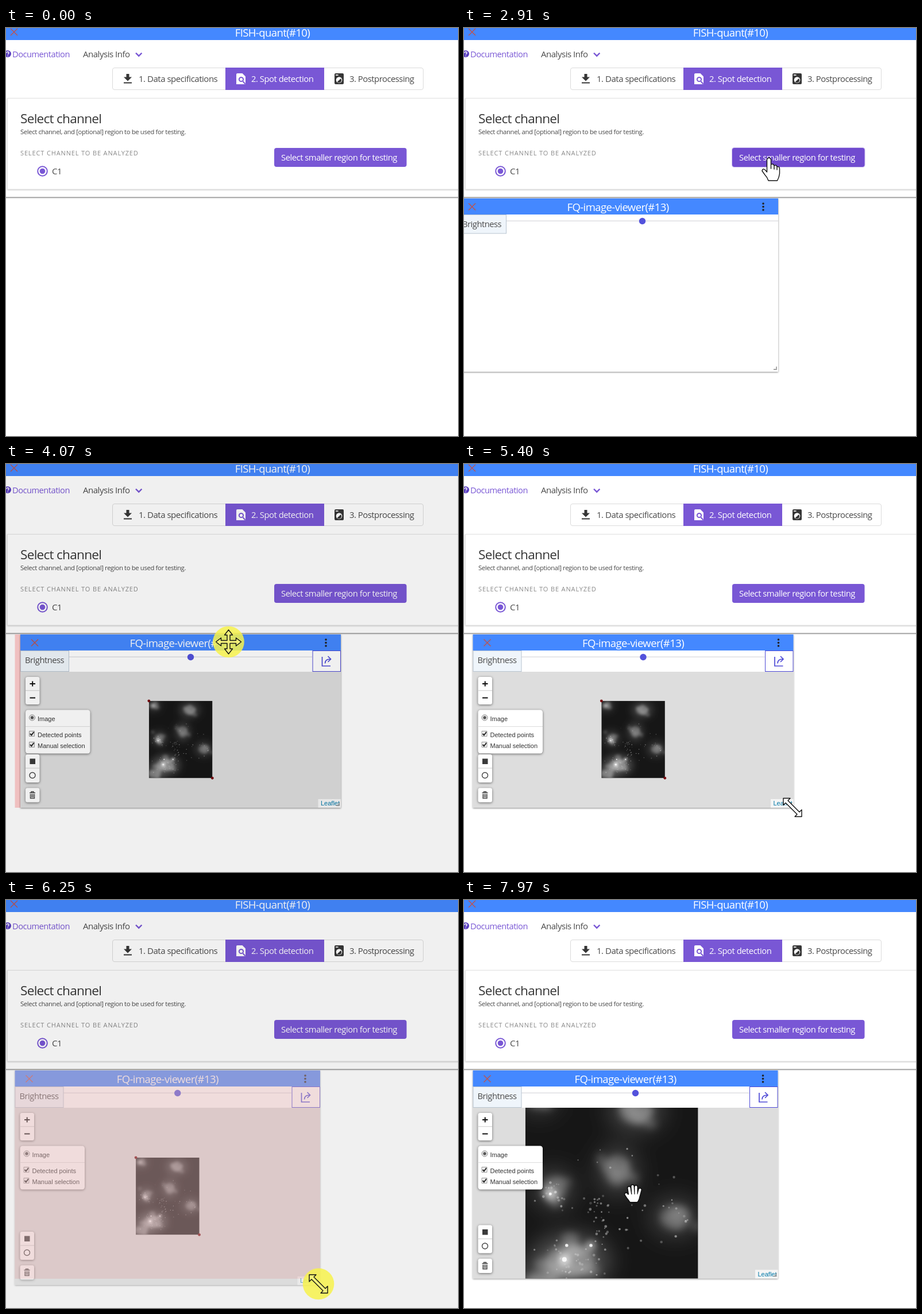
These frames come from a looping animation (787x711 px, 8000 ms). An HTML page:

```html
<!DOCTYPE html>
<html lang="en">
<head>
<meta charset="utf-8">
<title>Spot detection</title>
<style>
html, body { margin: 0; height: 100%; overflow: hidden; background: #fff; }
#stage { display: block; width: 100vw; height: 100vh; }
text { font: 15px "Open Sans", "Noto Sans", sans-serif; letter-spacing: -.032em; fill: #4a4a4a; }
text.title { font-size: 18.5px; fill: #fff; text-anchor: middle; }
text.head { font-size: 22.6px; font-weight: 500; fill: #363636; }
text.small { font-size: 11.3px; }
text.caps { font-size: 11px; letter-spacing: .86px; fill: #8a8a8a; }
text.on { fill: #fff; font-weight: 500; font-size: 14.8px; }
text.ui { font: 11px "Liberation Sans", Arial, sans-serif; letter-spacing: 0; fill: #333; }
.line { fill: none; stroke-width: 1.4; }
.card { fill: #fff; filter: drop-shadow(0 1px 2px #0008); }
.frame { fill: #fff; filter: drop-shadow(0 1px 1.5px #0007); }
#cursor path { stroke: #111; stroke-width: 1.4; stroke-linejoin: round; stroke-linecap: round; }
</style>
</head>
<body>
<svg id="stage" viewBox="0 0 787 711">
  <defs>
    <filter id="soft" x="-30%" y="-30%" width="160%" height="160%"><feGaussianBlur stdDeviation="2.3"/></filter>
    <filter id="haze" x="-60%" y="-60%" width="220%" height="220%"><feGaussianBlur stdDeviation="7"/></filter>
    <path id="x" class="line" stroke="#c0524c" d="M-6-6L6 6M6-6L-6 6"/>
  </defs>

  <rect width="787" height="21" fill="#48f"/>
  <use href="#x" x="14" y="7"/>
  <text class="title" x="464" y="15">FISH-quant(#10)</text>

  <circle cx="3" cy="45" r="6" fill="#5a3fc0"/>
  <path class="line" stroke="#fff" d="M1 43.500Q1 41.500 3 41.500T5 43.500Q5 44.500 3 46M3 48v1.200"/>
  <text x="11" y="51" style="fill:#7957d5;font-size:14.600px">Documentation</text>
  <text x="134" y="51">Analysis Info</text>
  <path d="M226 43.500l5.200 5.200l5.200-5.200" fill="none" stroke="#7957d5" stroke-width="2.400"/>

  <rect x="185.500" y="69.500" width="541" height="38" rx="3.500" fill="#fff" stroke="#dbdbdb"/>
  <rect x="382" y="69" width="172" height="39" fill="#7957d5"/>
  <path d="M209.500 80h5v5.500h4.500l-7 7l-7-7h4.500zM205 94.500h14v2h-14z" fill="#363636"/>
  <text x="231" y="94">1. Data specifications</text>
  <path d="M403 79h8.500l5.500 5.500v13.500h-16v-17q0-2 2-2z" fill="#fff"/>
  <path d="M412.500 93l4 4.500" stroke="#7957d5" stroke-width="2"/>
  <circle cx="409.500" cy="89.500" r="3.600" fill="#fff" stroke="#7957d5" stroke-width="2"/>
  <text class="on" x="427" y="94">2. Spot detection</text>
  <rect x="572" y="79" width="16" height="19" rx="2" fill="#363636"/>
  <circle cx="580" cy="90.500" r="5.300" fill="#fff"/>
  <path d="M576.600 93.900a4 4 0 0 0 6.400-5.800z" fill="#363636"/>
  <path d="M574 82h4.500" stroke="#fff" stroke-width="1.600"/>
  <text x="598" y="94" style="font-size:14.800px">3. Postprocessing</text>

  <rect class="frame" x="2.500" y="122.500" width="800" height="158.500" stroke="#e2e2e2" style="filter:drop-shadow(0 1px 1px #0003)"/>
  <text class="head" x="25" y="166">Select channel</text>
  <text class="small" x="25" y="184.500">Select channel, and [optional] region to be used for testing.</text>
  <text class="caps" x="25" y="222">SELECT CHANNEL TO BE ANALYZED</text>
  <circle cx="63.500" cy="249.500" r="8.300" fill="none" stroke="#7957d5" stroke-width="2"/>
  <circle cx="63.500" cy="249.500" r="4.800" fill="#7957d5"/>
  <text x="80" y="255">C1</text>
  <rect id="ring" x="466" y="208" width="232.500" height="35" rx="4.500" fill="#cfc2f0"/>
  <rect id="button" x="467" y="209" width="230.500" height="33" rx="4"/>
  <text class="on" x="479" y="231">Select smaller region for testing</text>
  <path d="M0 295.300h787" stroke="#999" stroke-width="1.600"/>
  <path d="M0 296.800h787" stroke="#ddd"/>

  <rect id="ghost" x="15.500" y="297" fill="#fcc"/>

  <g id="win">
    <rect id="frame" class="frame" y="297"/>
    <rect id="bar" y="297" height="28" fill="#48f"/>
    <use href="#x" x="25" y="311.500"/>
    <text id="name" class="title" y="319">FQ-image-viewer(#13)</text>
    <path id="track" stroke="#dfdfe3" stroke-width="1.600"/>
    <circle id="knob" cy="336.500" r="5.700" fill="#5352dc"/>
    <rect id="label" x=".5" y="325.500" width="84" fill="#eff5fb" stroke="#b9c4d0"/>
    <text x="8" y="347" style="font-size:14.700px">Brightness</text>
    <svg id="map" class="late" y="362">
      <rect width="100%" height="100%" fill="#ddd"/>
      <g id="photo">
        <svg width="110.500" height="134.500">
          <rect width="111" height="135" fill="#161616"/>
          <g id="glow" filter="url(#haze)"></g>
          <g id="cells" filter="url(#soft)"></g>
          <g id="spots"></g>
        </svg>
        <g fill="#780c10"><circle r="2.400"/><circle cx="110.500" cy="134.500" r="2.400"/></g>
      </g>
    </svg>
    <g class="late">
      <rect class="card" x="9" y="371" width="24.500" height="48" rx="3.500"/>
      <path d="M9 394.800h24.500" stroke="#ccc"/>
      <path d="M16.500 383h9.500M21.200 378.500v9M16.500 407.500h9.500" stroke="#111" stroke-width="2"/>
      <rect class="card" x="9" y="428.500" width="112.500" height="76" rx="4.500"/>
      <path d="M9 457.500h112.500" stroke="#ddd"/>
      <circle cx="20.500" cy="442" r="5" fill="#eee" stroke="#888"/>
      <circle cx="20.500" cy="442" r="2.700" fill="#555"/>
      <path d="M15.500 465.500h9v9h-9zM15.500 484.500h9v9h-9z" fill="#f2f2f2" stroke="#999"/>
      <path class="line" stroke="#222" style="stroke-width:2" d="M17 470l2.300 2.500l4.200-5.500M17 489l2.300 2.500l4.200-5.500"/>
      <text class="ui" x="30" y="447.500">Image</text>
      <text class="ui" x="30" y="476">Detected points</text>
      <text class="ui" x="30" y="494.500">Manual selection</text>
    </g>
    <g id="low" class="late">
      <rect class="card" x="9" y="-93" width="24.500" height="49" rx="3.500"/>
      <path d="M9-69h24.500" stroke="#ccc"/>
      <rect x="16.500" y="-85.500" width="9.500" height="9.500" fill="#3a3a3a"/>
      <circle class="line" cx="21" cy="-56.500" r="5" stroke="#444"/>
      <rect class="card" x="9" y="-34.500" width="24.500" height="25" rx="3.500"/>
      <path class="line" stroke="#444" d="M16-26h10M19-26v-2h4v2M17.500-24v7.500h7v-7.500M19.800-24v6M22.200-24v6"/>
    </g>
    <g id="right">
      <g fill="#222"><circle cx="-26" cy="306" r="1.800"/><circle cx="-26" cy="311.500" r="1.800"/><circle cx="-26" cy="317" r="1.800"/></g>
      <g class="late" fill="none" stroke="#4e4ad6">
        <rect x="-49" y="325.500" width="48.500" height="36" fill="#fff"/>
        <path stroke-width="1.700" d="M-32.500 336v16h14.500M-27.500 347.500q0-7.500 9-7.500M-22.500 335l5 5l-5 5"/>
      </g>
    </g>
    <g id="corner">
      <rect class="late" x="-39.500" y="-15" width="39.500" height="15" fill="#fff" fill-opacity=".7"/>
      <text class="ui late" x="-35" y="-4" style="fill:#0078a8">Leaflet</text>
      <path class="line" stroke="#888" d="M-8-4h5v-5"/>
    </g>
  </g>

  <rect id="dim" width="787" height="711" opacity=".06"/>
  <circle id="press" r="27.300" fill="#f8f44c" opacity=".84"/>
  <g id="cursor">
    <path id="arrow" d="M0 0V30L7 24L12 35L17 33L12 22.500H22Z"/>
    <path id="point" d="M-3.500 3Q0-3 3.500 3V12Q7.500 9.500 9 14Q13 11.500 14 16Q18 14.500 18.500 19V27Q18 34 14.500 40H-1Q-3 34-7 30L-12 23Q-11 18-7 21L-3.500 25ZM3.500 12v7M9 14v6M14 16v5"/>
    <path id="move" d="M0-21L7-12H2.500V-2.500H13V-7L22 0L13 7V2.500H2.500V12H7L0 21L-7 12H-2.500V2.500H-13V7L-22 0L-13-7V-2.500H-2.500V-12H-7Z"/>
    <path id="size" d="M-16-16H-4L-8-12L12 8L16 4V16H4L8 12L-12-8L-16-4Z"/>
    <g id="grab">
      <path style="stroke-width:7.500" d="M-8 8L-12 2M-5 4L-7-9M0 3L-1-12M5 3V-11M9 5L12-6M-7 4H9L8 9L6 13H-4L-9 6Z"/>
      <path style="stroke-width:4;stroke:#fff" d="M-8 8L-12 2M-5 4L-7-9M0 3L-1-12M5 3V-11M9 5L12-6M-7 4H9L8 9L6 13H-4L-9 6Z"/>
    </g>
  </g>
</svg>
<script>
const $ = id => document.getElementById(id);
const set = (id, attrs) => { for (const k in attrs) $(id).setAttribute(k, attrs[k]); };
const show = (el, on) => { el.style.display = on ? '' : 'none'; };
const within = (t, a, b) => t >= a && t < b;

let seed = 7;
const rnd = () => (seed = seed * 16807 % 2147483647) / 2147483647;
const bell = () => rnd() + rnd() + rnd() - 1.5;

function blob(parent, x, y, rx, ry, grey, opacity) {
  const e = document.createElementNS('http://www.w3.org/2000/svg', 'ellipse');
  const attrs = { cx: x, cy: y, rx, ry, fill: `rgb(${grey},${grey},${grey})`, opacity };
  for (const k in attrs) e.setAttribute(k, attrs[k]);
  $(parent).append(e);
}

// Nuclei: x, y, rx, ry, grey
[[71, 16, 12, 9, 135], [59, 54, 9, 11, 125], [96, 84, 11, 9, 115], [18, 66, 9, 9, 125],
 [29, 112, 17, 12, 165], [10, 127, 13, 9, 130], [9, 8, 8, 7, 120]].forEach(([x, y, rx, ry, g]) => {
  blob('glow', x, y, rx * 1.5, ry * 1.5, g, .4);
  blob('cells', x, y, rx * .9, ry * .9, g, .65);
  for (let i = 0; i < 9; i++)
    blob('cells', x + bell() * rx, y + bell() * ry, rx * .35, ry * .35, g + 25, .35);
});
[[25, 111, 3.5], [16, 69, 3], [42, 102, 2.5], [8, 8, 2]].forEach(([x, y, r]) => blob('cells', x, y, r, r, 255, .8));

// Bright spots: x, y, spread x, spread y, count
[[28, 112, 19, 13, 38], [48, 84, 6, 15, 30], [19, 68, 12, 10, 22], [60, 70, 55, 60, 30], [96, 82, 14, 12, 10]]
  .forEach(([x, y, sx, sy, n]) => {
    while (n--) {
      const r = .4 + rnd() * .5;
      blob('spots', x + bell() * sx, y + bell() * sy, r, r, 215, .2 + rnd() * .4);
    }
  });
[[25, 111, 1.5], [26.500, 102, 1], [42, 102, 1], [16, 69, .9]].forEach(([x, y, r]) => blob('spots', x, y, r, r, 255, .85));

// Eased keyframes: [time, ...values]
function at(keys, t) {
  let i = keys.findIndex(k => k[0] > t);
  if (i < 0) i = keys.length;
  if (i === 0) return keys[0].slice(1);
  const a = keys[i - 1], b = keys[i] || a;
  const p = b === a ? 0 : (t - a[0]) / (b[0] - a[0]);
  const e = p * p * (3 - 2 * p);
  return a.slice(1).map((v, j) => v + (b[j + 1] - v) * e);
}

const path = [[440, 708, 730], [1120, 471, 300], [1270, 476, 285], [1350, 478, 284], [1960, 531, 226],
  [2930, 531, 226], [3530, 350, 310], [3860, 350, 310], [4070, 387.5, 310], [4390, 387.5, 310],
  [4980, 576, 606], [5170, 573, 599], [5400, 572, 598.5], [5700, 572, 598.5], [6250, 544, 669],
  [6460, 544, 669], [6950, 290, 506], [7120, 292, 510], [7270, 294.5, 511]];
const shapes = [[0, 'arrow'], [1800, 'point'], [3000, 'arrow'], [3400, 'move'], [4560, 'grab'],
  [4880, 'arrow'], [5300, 'size'], [6560, 'grab']];
// Window: left, width, bottom
const box = [[3860, -11, 558, 599], [4070, 25, 558, 599], [4340, 25, 558, 599], [4520, 15.5, 558, 599],
  [5720, 15.5, 558, 599], [6250, 15.5, 531.5, 671], [6470, 15.5, 531.5, 671], [6650, 15.5, 531, 659.5]];

function zoom(t) {
  if (t >= 7970) return 2.72;
  const p = Math.min(1, Math.max(0, (t - 7390) / 260));
  return 2 - (1 - p) ** 2.5;
}

function draw(t) {
  const [x, y] = at(path, t), [left, w, b] = at(box, t);
  const open = t >= 2680, loaded = t >= 3100;
  const dragging = within(t, 3930, 4390), sizing = within(t, 5780, 6500);
  const pressed = within(t, 2510, 2680) || within(t, 3760, 4390) || within(t, 5700, 6500);
  const focus = within(t, 2680, 3760);

  set('button', { fill: focus ? '#704bcf' : '#7957d5' });
  show($('ring'), focus);
  show($('dim'), dragging || sizing);
  show($('ghost'), dragging || sizing);
  const shrunk = t > 6000;
  set('ghost', { width: shrunk ? 531.5 : 558.5, height: shrunk ? 363 : 302 });

  show($('win'), open);
  document.querySelectorAll('.late').forEach(el => show(el, loaded));
  set('win', { transform: `translate(${left})`, opacity: sizing ? .6 : 1 });
  set('frame', { width: w, height: b - 297 });
  set('bar', { width: w });
  set('name', { x: w / 2 });
  const end = loaded ? w - 50 : w;
  set('track', { d: `M84 336.3H${end}` });
  set('knob', { cx: (85 + end) / 2 });
  set('label', { height: loaded ? 36 : 32.5 });
  set('low', { transform: `translate(0 ${b})` });
  set('right', { transform: `translate(${w})` });
  set('corner', { transform: `translate(${w} ${b})` });

  set('map', { width: w, height: b - 362 });
  const s = zoom(t), fx = 295 - left, fy = 512 - 362;
  const px = fx + (w / 2 - 55.2 - fx) * s, py = fy + ((b - 362) / 2 - 67.7 - fy) * s;
  set('photo', { transform: `translate(${px} ${py}) scale(${s})` });

  show($('press'), pressed);
  set('press', { cx: x, cy: y - (t < 3000 ? 1.5 : 0) });
  set('cursor', { transform: `translate(${x} ${y})`, fill: pressed && t > 3000 ? '#f4f17a' : '#fff' });
  const shape = shapes.filter(k => k[0] <= t).pop()[1];
  for (const el of $('cursor').children) show(el, el.id === shape);
}

const start = performance.now();
function tick(now) {
  draw(Math.max(0, now - start) % 8000);
  requestAnimationFrame(tick);
}
draw(0);
requestAnimationFrame(tick);
</script>
</body>
</html>
```
